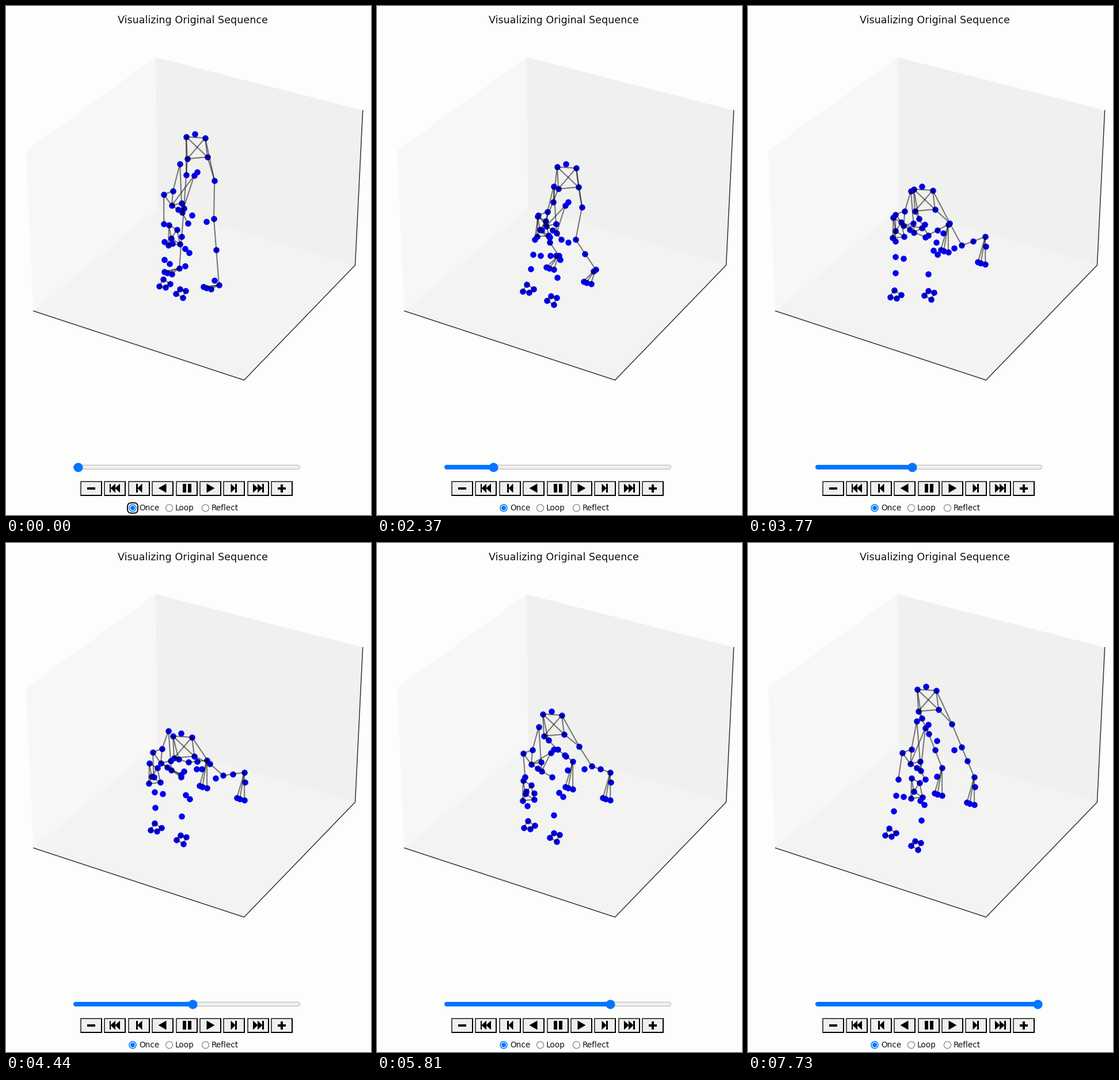
Recreate the animation shown at these times as a matplotlib script. Size 634 by 883 pixels, loop 7970 ms.

```python
import numpy as np
import matplotlib.pyplot as plt
from matplotlib.animation import FuncAnimation
from matplotlib.collections import LineCollection, PolyCollection
from matplotlib.patches import Circle, FancyBboxPatch

W, H, DPI = 634, 883, 100
LOOP, TICK = 7970, 10
PX = 72 / DPI
BG, BLUE = "#fdfdfb", "#0075ff"
START, END, STEP = 940, 7490, 33.4

# The dancer bends from standing to a crouch and rises again; only these
# body parts have paths, every other marker follows from them.
KEYS = np.array([1030, 2370, 3140, 4440, 5810, 7445])
PATHS = {
    "hip": [(331, 245), (331, 298), (304, 314), (308, 353), (306, 314), (312, 272)],
    "shoulder": [(294, 341), (300, 377), (279, 375), (275, 377), (274, 379), (288, 378)],
    "head": [(291, 400), (287, 385), (267, 380), (257, 403), (262, 432), (292, 428)],
    "kneeR": [(361, 369), (345, 406), (362, 422), (377, 403), (373, 387), (371, 354)],
    "ankleR": [(370, 484), (380, 456), (408, 406), (414, 398), (405, 398), (393, 406)],
    "kneeL": [(309, 351), (286, 390), (305, 407), (317, 380), (314, 358), (314, 331)],
    "ankleL": [(301, 455), (316, 432), (345, 384), (349, 377), (340, 379), (337, 390)],
    "handL": [(275, 482), (262, 491), (253, 505), (260, 494), (264, 490), (247, 503)],
    "handR": [(304, 497), (304, 509), (324, 490), (305, 513), (309, 509), (292, 523)],
}

# Rigid marker groups around a body part
GROUPS = {
    "hip": [(15, -16), (-18, -18), (19, 17), (-16, 20)],
    "shoulder": [(-4, -20), (-20, -14), (-6, 5), (11, 1), (5, 12), (12, 17)],
    "head": [(-8, -20), (6, -12), (11, 13), (-9, 15), (-4, 3)],
    "handL": [(-2, -8), (10, 0), (2, 6), (-9, 4)],
    "handR": [(-2, -6), (8, -3), (3, 9), (-9, 2)],
}
TOES = [(-6, -2), (-1, 0), (7, 2)]

CHAINS = [
    "hip1 hip2 hip4 hip3 hip1 hip4", "hip2 hip3",
    "hip1 thighR hip3", "hip2 thighL hip4",
    "shoulder1 spine shoulder4", "shoulder3 chest shoulder6",
    "shoulder1 shoulder2 shoulder3 shoulder1",
    "shoulder4 shoulder3 shoulder5 shoulder6 shoulder4",
    "shoulder2 upperL", "shoulder6 upperR",
    "head1 head2 head3 head4 head1 head5 head3", "head2 head5 head4",
]
for s in "LR":
    CHAINS += [f"thigh{s} knee{s} ankle{s} toe{s}1", f"toe{s}2 ankle{s} toe{s}3",
               f"hand{s}1 hand{s}2 hand{s}3 hand{s}4 hand{s}1"]

TRACKS = np.array(list(PATHS.values()), float).transpose(1, 0, 2)
GAPS = np.diff(KEYS)


def monotone_slopes():
    """Slopes of a cubic that never overshoots the key points."""
    rate = np.diff(TRACKS, axis=0) / GAPS[:, None, None]
    prod, total = rate[:-1] * rate[1:], rate[:-1] + rate[1:]
    slopes = np.zeros_like(TRACKS)
    slopes[1:-1] = np.where(prod > 0, 2 * prod / np.where(prod > 0, total, 1), 0)
    return slopes


SLOPES = monotone_slopes()


def paths_at(t):
    t = np.clip(t, KEYS[0], KEYS[-1])
    k = min(np.searchsorted(KEYS, t, side="right") - 1, len(GAPS) - 1)
    h = GAPS[k]
    u = (t - KEYS[k]) / h
    pts = ((1 + 2 * u) * (1 - u) ** 2 * TRACKS[k] + u * (1 - u) ** 2 * h * SLOPES[k]
           + u * u * (3 - 2 * u) * TRACKS[k + 1] + u * u * (u - 1) * h * SLOPES[k + 1])
    return dict(zip(PATHS, pts))


def along(a, b, part, dx=0, dy=0):
    return a + part * (b - a) + (dx, dy)


def add_leg(m, side, hip, floor, inner, heel, thigh):
    knee, ankle = m["knee" + side], m["ankle" + side]
    # the foot lies flat on the floor and hangs down once the ankle is lifted
    drop = min(46, 0.65 * (floor - ankle[1]))
    foot = ankle + (0.35 * drop - 23, drop)
    m["thigh" + side] = along(hip, knee, *thigh)
    m["inner" + side] = knee + inner
    m["shin" + side] = along(knee, ankle, 0.47)
    m["heel" + side] = along(ankle, foot, 0.6, *heel)
    for i, d in enumerate(TOES, 1):
        m[f"toe{side}{i}"] = foot + d


def markers(t):
    base = paths_at(t)
    m = {name: p for name, p in base.items() if name not in GROUPS}
    for name, offsets in GROUPS.items():
        for i, d in enumerate(offsets, 1):
            m[f"{name}{i}"] = base[name] + d
    hip, shoulder = base["hip"], base["shoulder"]
    m["back"] = along(m["hip1"], m["hip2"], 0.5, -2, -6)
    m["front"] = hip + (1, 43)
    m["chest"] = hip + (-4, 49)
    m["spine"] = along(hip, shoulder, 0.78, 0, -46)
    add_leg(m, "R", m["hip3"], 492, (-13, 5), (5, -11), (0.38, 8))
    add_leg(m, "L", m["hip4"], 467, (14, 12), (-5, -13), (0.32, 0))

    top, hand = m["shoulder2"], base["handL"]
    for name, part, dx in (("upperL", 0.33, 0), ("elbowL", 0.53, 0),
                           ("crookL", 0.55, 14), ("foreL", 0.73, 0)):
        m[name] = along(top, hand, part, dx)
    top, hand = m["shoulder6"], base["handR"]
    m["elbowR"] = hand + (7, -76)
    m["crookR"] = m["elbowR"] + (7, 7)
    m["upperR"] = along(top, m["elbowR"], 0.35, 8, -3)
    m["foreR"] = along(top, hand, 0.67, 6)
    return m


ORDER = list(markers(0))
LINKS = np.array([(ORDER.index(a), ORDER.index(b))
                  for chain in CHAINS
                  for a, b in zip(chain.split(), chain.split()[1:])])

fig = plt.figure(figsize=(W / DPI, H / DPI), dpi=DPI, facecolor=BG)
ax = fig.add_axes([0, 0, 1, 1])
ax.set(xlim=(0, W), ylim=(H, 0))
ax.axis("off")


def polys(shapes, colors, z=1):
    ax.add_collection(PolyCollection(shapes, facecolors=colors, edgecolors="none", zorder=z))


def line(xs, ys, color, width, z):
    return ax.plot(xs, ys, color=color, lw=width * PX, zorder=z, solid_capstyle="round")[0]


def box(x0, y0, x1, y1):
    return [(x0, y0), (x1, y0), (x1, y1), (x0, y1)]


def label(x, y, text, size, align="left"):
    ax.text(x, y, text, fontsize=size * PX, family="DejaVu Sans", color="#111111",
            ha=align, va="baseline")


def draw_room():
    top, mid, left, right = (260, 89), (263, 350.5), (47.5, 529), (606.5, 449.5)
    near, high = (413.5, 649), (619.7, 181)
    polys([[(35, 251), top, mid, left], [top, high, right, mid], [left, mid, right, near]],
          ["#f7f7f6", "#f0f0ef", "#f3f3f2"])
    line(*zip(left, near, right, high), "#333333", 1.5, 2)


def tri(x, w, h=8):
    """Triangle pointing right with its tip at x."""
    return [(x, 0), (x - w, -h), (x - w, h)]


def draw_buttons():
    flip = lambda icon: [[(-x, y) for x, y in s] for s in icon]
    minus = [box(-7, -2, 7, 2)]
    play = [tri(7.5, 14)]
    step = [tri(2.5, 8), box(2, -7.5, 5, 7.5)]
    fast = [tri(-0.5, 8.5), tri(7.5, 8.5), box(7, -7.5, 9.5, 7.5)]
    pause = [box(-7.5, -7.5, -1.5, 7.5), box(1.5, -7.5, 7.5, 7.5)]
    plus = minus + [box(-2, -7, 2, 7)]
    icons = [minus, flip(fast), flip(step), flip(play), pause, play, step, fast, plus]
    faces, colors, marks = [], [], []
    for i, icon in enumerate(icons):
        x0 = round(129 + 41.4 * i)
        x1, y0, y1 = x0 + 38, 824, 850
        faces += [box(x0, y0, x1, y1),
                  [(x0, y0), (x1, y0), (x1 - 2, y0 + 2), (x0 + 2, y1 - 2), (x0, y1)],
                  box(x0 + 2, y0 + 2, x1 - 2, y1 - 2)]
        colors += ["#000000", "#4c4c4c", "#efefef"]
        marks += [[(x0 + 19 + x, 836.5 + y) for x, y in s] for s in icon]
    polys(faces, colors, 2)
    polys(marks, "black", 3)


def draw_radios():
    for x, text_x, text in ((220, 231, "Once"), (283.5, 294, "Loop"), (346.5, 357, "Reflect")):
        on = text == "Once"
        ax.add_patch(Circle((x, 870.8), 6, fc="white", ec=BLUE if on else "#767676",
                            lw=(1.5 if on else 1.1) * PX, zorder=3))
        if on:
            ax.add_patch(Circle((x, 870.8), 4, fc=BLUE, ec="none", zorder=4))
        label(text_x, 875, text, 13.6)


draw_room()
draw_buttons()
draw_radios()
label(324, 30, "Visualizing Original Sequence", 17.5, "center")
line([121, 507], [800, 800], "#b2b2b2", 8, 2)
line([121, 507], [800, 800], "#efefef", 6, 3)
played = line([121, 125], [800, 800], BLUE, 8, 4)
knob, = ax.plot([125], [800], "o", color=BLUE, ms=16 * PX, mew=0, zorder=5)
focus = ax.add_patch(FancyBboxPatch((219, 869.8), 2, 2, boxstyle="round,pad=8,rounding_size=7",
                                    fc="white", ec="#101010", lw=2 * PX, zorder=2))
dots, = ax.plot([], [], "o", color="#0000f0", ms=10.6 * PX, mew=0, zorder=6)
bones = ax.add_collection(LineCollection([], colors="black", linewidths=2.1 * PX,
                                         alpha=0.5, zorder=7))


def draw(i):
    now = i * TICK
    t = END if now >= END else START + max(now - START, 0) // STEP * STEP
    pts = np.array(list(markers(t).values()))
    dots.set_data(pts[:, 0], pts[:, 1])
    bones.set_segments(pts[LINKS])
    x = np.interp(t, [KEYS[0], KEYS[-1]], [125, 503])
    played.set_xdata([121, x])
    knob.set_xdata([x])
    focus.set_visible(now < 770)
    return dots, bones, played, knob, focus


anim = FuncAnimation(fig, draw, frames=LOOP // TICK, interval=TICK, init_func=lambda: draw(0),
                     repeat=True, repeat_delay=0, blit=False)
plt.show()
```
